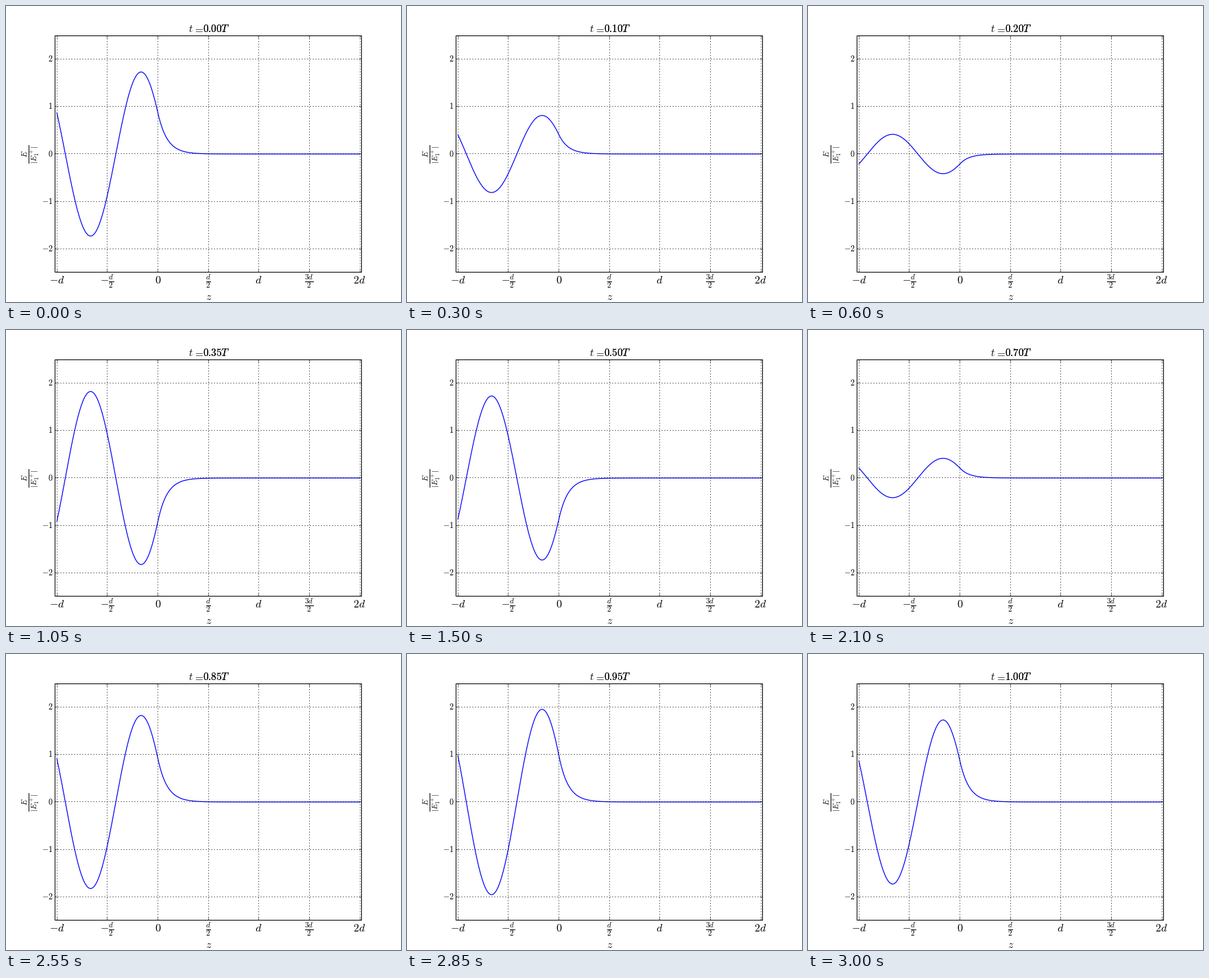
A matplotlib script for the animation above (3.15 s loop, 576 px wide and 432 px high).

```python
import numpy as np
import matplotlib.pyplot as plt
from matplotlib.animation import FuncAnimation
from matplotlib.transforms import ScaledTranslation

FRAMES, STEP_MS = 21, 150
W, H, DPI = 576, 432, 72
NUDGE = 0.51  # shifts the frame and grid so lines snap down to whole pixels

plt.style.use("classic")
plt.rcParams["mathtext.fontset"] = "cm"

fig = plt.figure(figsize=(W / DPI, H / DPI), dpi=DPI, facecolor="white")
ax = fig.add_axes([0.125 - NUDGE / W, 0.1 + NUDGE / H, 0.775, 0.8])
ax.set_xlim(-1.015, 2.015)
ax.set_ylim(-2.5, 2.5)
ax.grid(True, lw=1)
ax.set_xticks(np.arange(-1, 2.1, 0.5), [""] * 7)
ax.set_yticks(range(-2, 3), [""] * 5)


def label(x, y, tex, size, ha="center", va="baseline", **kw):
    """Place math text at stage pixels, measured from the top left."""
    return fig.text(x / W, 1 - y / H, f"${tex}$", size=size,
                    ha=ha, va=va, **kw)


X_LABELS = ["-d", r"-\frac{d}{2}", "0", r"\frac{d}{2}", "d",
            r"\frac{3d}{2}", "2d"]
for i, tex in enumerate(X_LABELS):
    label(74 + 73.6 * i, 405, tex, 16)
for v in range(-2, 3):
    label(68.4, 216 - 69.12 * v, str(v), 12, ha="right", va="center")

label(295.5, 429, "z", 16)
label(36, 216, r"\frac{E}{|E_1^+|}", 16, va="center", rotation=90)

label(266.5, 38, "t", 15, ha="left")
label(280.5, 38, "=", 15)
# Two overlaid copies give the heavier strokes of the running value.
clocks = [label(287, 38, "0.00T", 15, ha="left") for _ in range(2)]

# Standing wave for z < 0, evanescent tail for z > 0 (lengths in units of d).
K = 2 * np.pi
PHASE = np.pi / 3
z = np.linspace(-1, 2, 601)
profile = np.where(z < 0, 2 * np.cos(K * z + PHASE),
                   np.exp(-K * np.tan(PHASE) * np.maximum(z, 0)))
unshift = ScaledTranslation(NUDGE / DPI, -NUDGE / DPI, fig.dpi_scale_trans)
wave, = ax.plot(z, profile, color="blue", lw=1.2,
                transform=ax.transData + unshift)


def update(n):
    t = n / (FRAMES - 1)
    wave.set_ydata(profile * np.cos(2 * np.pi * t + np.pi / 6))
    for clock in clocks:
        clock.set_text(f"${t:.2f}T$")
    return wave, *clocks


anim = FuncAnimation(fig, update, frames=FRAMES, interval=STEP_MS,
                     repeat=True, repeat_delay=0)
plt.show()
```
